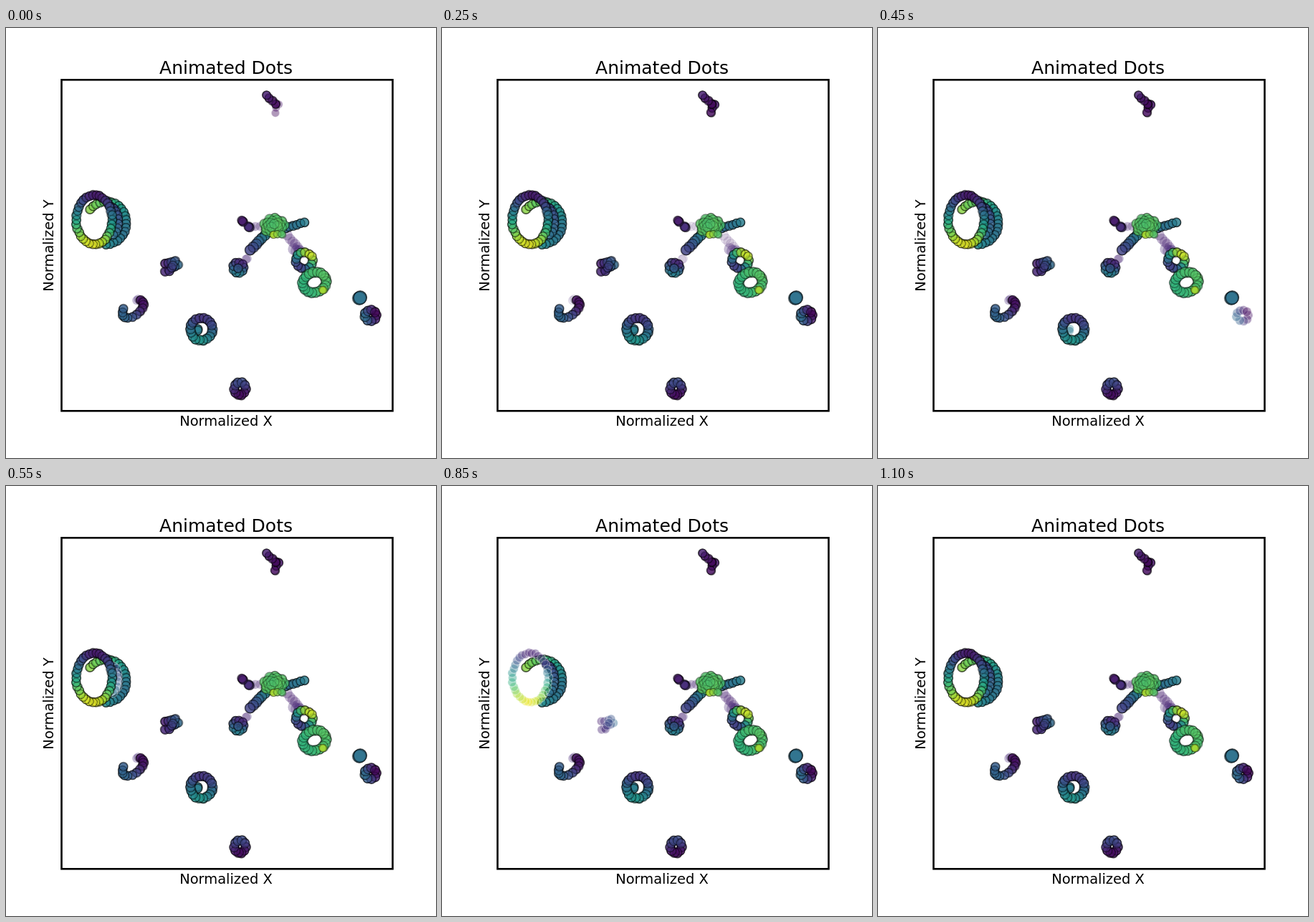
An HTML page with a canvas for the animation above (1150 ms loop, 600 by 600 pixels).

```html
<!DOCTYPE html>
<html lang="en">
<head>
<meta charset="utf-8">
<title>Animated Dots</title>
<style>
  html, body { margin: 0; width: 100%; height: 100%; overflow: hidden; background: #fff; }
  canvas { display: block; }
</style>
</head>
<body>
<canvas id="stage" width="600" height="600"></canvas>
<script>
const ctx = document.getElementById('stage').getContext('2d');
const STEP = 50, STEPS = 23, PASSES = 3, GAP = 5.5, TAU = Math.PI * 2;

const viridis = ['440154', '482878', '3e4a89', '31688e', '26828e',
  '1f9e89', '35b779', '6ece58', 'b5de2b', 'fde725']
  .map(h => [0, 2, 4].map(i => parseInt(h.slice(i, i + 2), 16)));

const mix = (a, b, k) => a + (b - a) * k;

function colour(v, alpha) {
  const p = Math.max(0, Math.min(.999, v)) * 9, i = Math.floor(p);
  const rgb = viridis[i].map((c, k) => Math.round(mix(c, viridis[i + 1][k], p - i)));
  return `rgba(${rgb},${alpha})`;
}

let seed = 7;
const jitter = size => {
  seed = (seed * 16807) % 2147483647;
  return (seed / 2147483647 - .5) * size;
};

// Straight row of dots whose colour value runs from v1 to v2.
function line(x1, y1, x2, y2, v1, v2 = v1) {
  const n = Math.max(1, Math.round(Math.hypot(x2 - x1, y2 - y1) / GAP));
  return Array.from({ length: n + 1 }, (_, i) =>
    ({ x: mix(x1, x2, i / n), y: mix(y1, y2, i / n), v: mix(v1, v2, i / n) }));
}

// Elliptical arc, clockwise in degrees; the colour value is a cosine that tops out at peak.
function ring(cx, cy, rx, ry, [mid, amp, peak], { tilt = 0, from = 0, to = 360 } = {}) {
  const n = Math.round(Math.PI * (rx + ry) / GAP * (to - from) / 360);
  const c = Math.cos(tilt), s = Math.sin(tilt);
  return Array.from({ length: n }, (_, i) => {
    const deg = mix(from, to, i / n), a = deg / 360 * TAU;
    const x = rx * Math.cos(a), y = ry * Math.sin(a);
    return { x: cx + x * c - y * s, y: cy + x * s + y * c,
      v: mid + amp * Math.cos((deg - peak) / 360 * TAU) };
  });
}

// Ellipse filled by a spiral of n dots.
function disc(cx, cy, rx, ry, n, v, spread = 0) {
  return Array.from({ length: n }, (_, i) => {
    const q = Math.sqrt(1 - i / n), a = i * 2.4;
    return { x: cx + rx * q * Math.cos(a), y: cy + ry * q * Math.sin(a), v: v + jitter(spread) };
  });
}

// Each part is laid down in several slightly shaken passes.
const parts = [];
function add(name, dots, { r = 6, soft = false, ink = .45 } = {}) {
  const passes = Array.from({ length: PASSES }, () =>
    dots.map(d => ({ x: d.x + jitter(1.6), y: d.y + jitter(1.6), v: d.v + jitter(.05) })));
  parts.push({ name, passes, r, soft, ink });
}

// Interlocked rings
add('back', ring(139.5, 272, 28.5, 30, [.6, .22, 210], { from: -140, to: 100 }));
add('strip', ring(142, 270, 15, 22, [.25, .1, 60], { from: -75, to: 75 }));
add('front', ring(123, 267.5, 25, 34.5, [.52, .44, 97]));

// Small groups
add('tail', [...line(377, 106, 381, 107, .05), ...line(377, 112, 375.5, 118, .05)], { r: 5.7 });
add('head', line(376, 106, 363.5, 93.5, .04, .08), { r: 5.7 });
add('blob', [...line(240, 330, 222, 340, .32, .1), ...line(222, 329, 236, 325, .1, .28),
  ...line(228, 339, 233, 331, .13, .22)]);
add('wheel', [...ring(324.5, 334.5, 7.5, 7.5, [.28, .16, 110]), ...line(324, 335, 324, 336, .3)]);
add('glow', [...line(182, 380, 184, 378, .1), ...line(336, 322, 335, 323, .1)], { soft: true });
add('hook', ring(177, 392, 17, 9.5, [.19, .15, 180], { tilt: -.6, from: -25, to: 255 }));
add('hub', line(268, 420, 267, 422, .42));
add('hoop', ring(272.7, 420.3, 15.6, 15.6, [.33, .18, 100]), { r: 6.4 });
add('single', line(493, 376.5, 494, 376, .38), { r: 9 });
add('right', ring(508.5, 401, 8, 7.5, [.18, .16, 165]), { r: 6.4 });
add('bottom', ring(326.5, 503.5, 7.8, 9, [.12, .1, 270]), { r: 6.4 });

// Central figure
add('links', line(354, 277, 343, 277, .1), { soft: true });
add('links', line(393, 290, 413, 314, .1), { soft: true, r: 7 });
add('hand', [...line(340, 278, 338, 277, .14), ...line(331, 270, 329, 269, .08)]);
add('arm', line(365, 285, 341, 310, .48, .18), { r: 7 });
add('reach', line(390, 279, 416, 271.5, .33, .42));
add('body', disc(373.5, 275.5, 14.5, 11, 24, .73), { r: 6.6, ink: .28 });
add('body', line(373, 288, 385, 288, .88, .72), { r: 5, ink: .25 });
add('knee', line(401, 309, 410, 312, .12), { soft: true, r: 8 });
add('knee', ring(416, 324.5, 12, 11.5, [.55, .38, -50]));
add('foot', ring(430.5, 355, 16.8, 14, [.69, .04, 0], { tilt: -.35 }), { r: 6.8, ink: .35 });
add('foot', line(442, 366, 443, 366, .86), { r: 5, ink: .2 });

// Groups that turn pale, one entry per step of the loop.
const pale = ('tail|head|single|reach|hand|links glow|arm|foot|hoop|right hub|back|strip|' +
  'hook|wheel|knee|bottom|strip|front blob|back|hub|arm|hook|')
  .split('|').map(names => names.split(' '));

// Settled parts build up under dark outlines, pale ones get a single thin coat.
function drawPart({ passes, r, soft, ink }, faded) {
  const light = faded || soft;
  const alpha = soft ? (faded ? .12 : .3) : faded ? .42 : .45;
  ctx.lineWidth = 1.2;
  for (const d of light ? passes[0] : passes.flat()) {
    ctx.beginPath();
    ctx.arc(d.x, d.y, r, 0, TAU);
    ctx.fillStyle = colour(d.v, alpha);
    ctx.fill();
    ctx.strokeStyle = soft ? colour(d.v, .1) : faded ? 'rgba(255,255,255,.35)' : `rgba(0,0,0,${ink})`;
    ctx.stroke();
  }
}

function label(text, x, y, size, turn = 0) {
  ctx.save();
  ctx.translate(x, y);
  ctx.rotate(turn);
  ctx.font = `${size}px "DejaVu Sans", sans-serif`;
  ctx.textAlign = 'center';
  ctx.fillStyle = '#000';
  ctx.fillText(text, 0, 0);
  ctx.restore();
}

function draw(step) {
  ctx.fillStyle = '#fff';
  ctx.fillRect(0, 0, 600, 600);
  for (const part of parts) drawPart(part, pale[step].includes(part.name));
  ctx.strokeStyle = '#000';
  ctx.lineWidth = 2.6;
  ctx.strokeRect(77.5, 72.3, 462, 462);
  label('Animated Dots', 307, 64, 25);
  label('Normalized X', 307, 555, 19.44);
  label('Normalized Y', 66, 303.5, 19.44, -Math.PI / 2);
}

let shown = -1;
const start = performance.now();
function tick() {
  const step = Math.floor((performance.now() - start) / STEP) % STEPS;
  if (step !== shown) draw(shown = step);
  requestAnimationFrame(tick);
}
tick();
</script>
</body>
</html>
```
